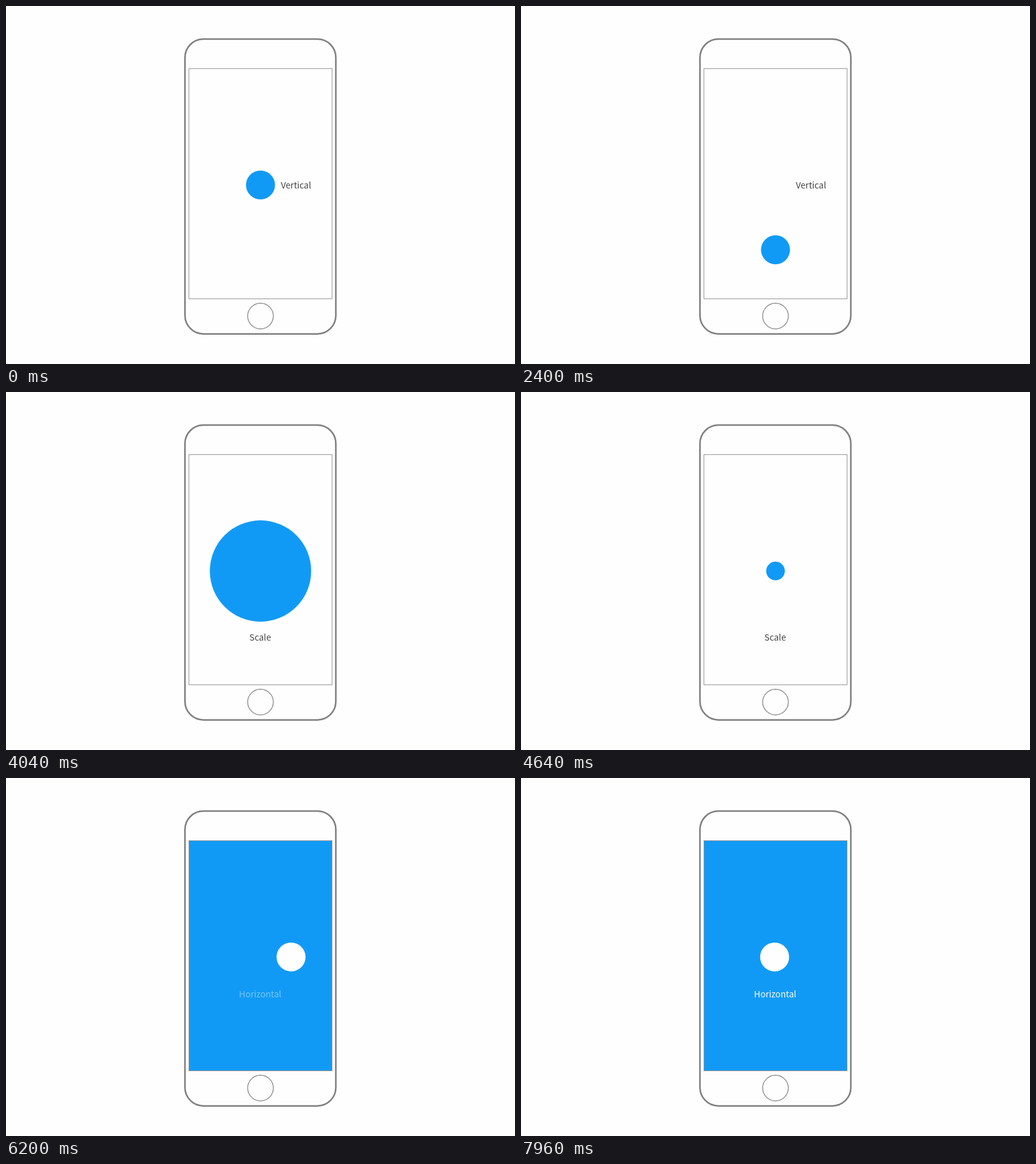
Animation, 800 px wide and 563 px high, one loop 8 s. Source, as an HTML page with a canvas:

```html
<!DOCTYPE html>
<html lang="en">
<head>
<meta charset="utf-8">
<title>Ball moves</title>
<style>
  html, body { margin: 0; width: 100%; height: 100%; overflow: hidden; background: #fefefe; }
  canvas { display: block; }
</style>
</head>
<body>
<canvas id="stage" width="800" height="563"></canvas>
<script>
const ctx = document.getElementById('stage').getContext('2d');
const LOOP = 8000, STEP = 80, FADE = 200;
const FREQ = 3.5, DECAY = 10;
const CX = 400, CY = 281.5, R = 22.8;
const BLUE = '#119af5', WHITE = '#fefefe', GREY = '#808080', INK = '#444444';
const FONT = '13.6px "Noto Sans CJK SC", "Noto Sans CJK JP", "Noto Sans", sans-serif';

// Each move: [start ms, goal, bounce strength]
const vertical = [[1060, 184, 0.27], [1978, 381.5, 0.31], [2838, CY, 0.28]];
const growth = [[3615, 78.8, 0.5], [4505, R, 0.27], [5214.7, 240, 0]];
const shrink = [[5214.7, R, 0]];
const horizontal = [[6141, 464, 0.3125], [6940, 336, 0.3125], [7637, CX, 0.3125]];

const clamp = v => Math.min(1, Math.max(0, v));
const ramp = (t, start, length) => clamp((t - start) / length);

// Straight run to the goal, then a decaying swing around it.
function follow(t, from, moves) {
  let pos = from;
  for (const [start, goal, bounce] of moves) {
    if (t < start) break;
    const dist = goal - from;
    const s = (t - start - STEP) / 1000;
    pos = s < 0
      ? from + dist * (t - start) / STEP
      : goal + dist * bounce * Math.sin(2 * Math.PI * FREQ * s) * Math.exp(-DECAY * s);
    from = goal;
  }
  return pos;
}

function disc(x, y, r, color, alpha = 1) {
  ctx.globalAlpha = alpha;
  ctx.fillStyle = color;
  ctx.beginPath();
  ctx.arc(x, y, Math.max(0, r), 0, 2 * Math.PI);
  ctx.fill();
  ctx.globalAlpha = 1;
}

function label(text, x, y, color, alpha, align) {
  if (alpha <= 0) return;
  ctx.globalAlpha = alpha;
  ctx.fillStyle = color;
  ctx.font = FONT;
  ctx.textAlign = align;
  ctx.fillText(text, x, y);
  ctx.globalAlpha = 1;
}

function phone() {
  ctx.strokeStyle = GREY;
  ctx.lineWidth = 2.5;
  ctx.beginPath();
  ctx.roundRect(281.3, 52, 237.1, 463.7, 29);
  ctx.stroke();

  ctx.lineWidth = 1.2;
  ctx.beginPath();
  ctx.arc(CX, 487.6, 20.2, 0, 2 * Math.PI);
  ctx.stroke();

  ctx.strokeStyle = '#999999';
  ctx.lineWidth = 1;
  ctx.strokeRect(287.5, 98.5, 225, 362);
}

function draw(t) {
  ctx.fillStyle = WHITE;
  ctx.fillRect(0, 0, 800, 563);

  ctx.save();
  ctx.beginPath();
  ctx.rect(287.5, 98.5, 225, 362);
  ctx.clip();
  disc(CX, follow(t, CY, vertical), follow(t, R, growth), BLUE);
  const shown = ramp(t, 5214.7, 125);
  if (shown > 0) {
    disc(follow(t, CX, horizontal), CY, follow(t, 37.7, shrink), WHITE, shown);
  }
  ctx.restore();

  label('Vertical', 432, 287, INK, 1 - ramp(t, 2830, FADE), 'left');
  label('Scale', 399.5, 391, INK, ramp(t, 3610, FADE) - ramp(t, 5250, FADE), 'center');
  label('Horizontal', 399.5, 345, WHITE, ramp(t, 6115, FADE), 'center');
  phone();
}

function tick() {
  draw(performance.now() % LOOP);
  requestAnimationFrame(tick);
}
tick();
</script>
</body>
</html>
```
